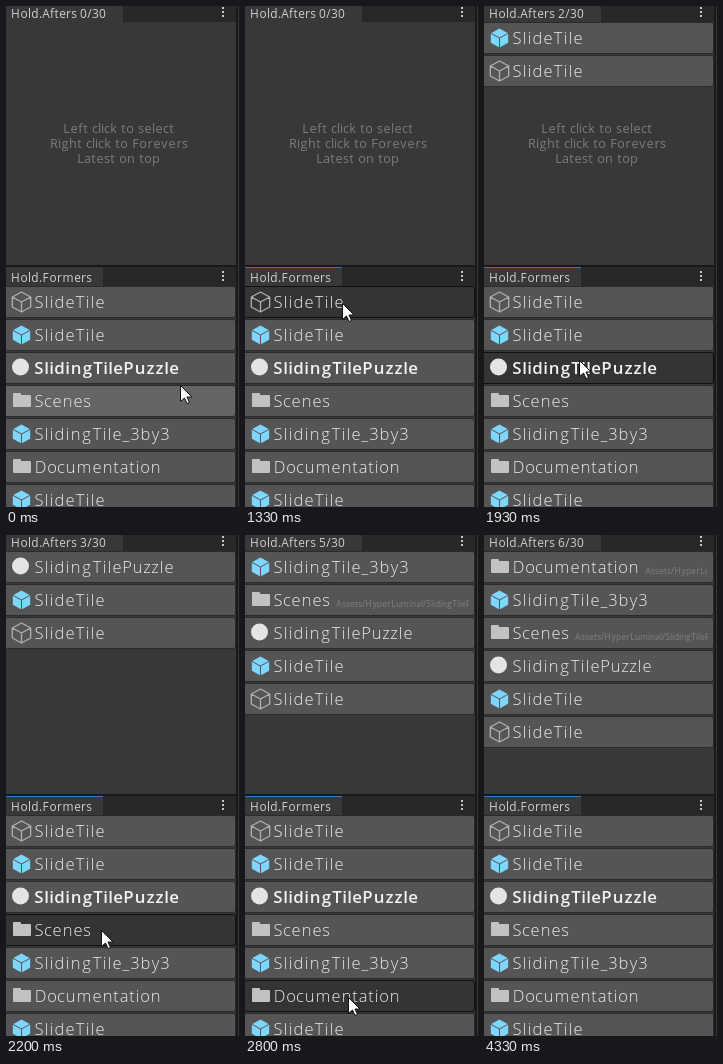
An HTML page with a canvas for the animation above (4790 ms loop, 233 px wide and 501 px high).

```html
<!DOCTYPE html>
<html lang="en">
<head>
<meta charset="utf-8">
<title>Asset shelf</title>
<style>
  html, body { margin: 0; width: 100%; height: 100%; overflow: hidden; background: #383838; }
  canvas { display: block; width: 233px; height: 501px; }
</style>
</head>
<body>
<canvas id="stage" width="233" height="501"></canvas>
<script>
const ctx = document.getElementById('stage').getContext('2d');
const LOOP = 4790, STEP = 1000 / 15;
const PITCH = 33, RECENTS_TOP = 280, LATERS_TOP = 16;
const PATH = 'Assets/HyperLuminal/SlidingTilePuzzle';
const START = [174, 379], EXIT = [111, 503];

// aim: where the pointer rests on each row
const recents = [
  { icon: 'wire', name: 'SlideTile', aim: [97, 297] },
  { icon: 'cube', name: 'SlideTile', aim: [98, 328] },
  { icon: 'scene', name: 'SlidingTilePuzzle', aim: [95, 354], bold: true },
  { icon: 'folder', name: 'Scenes', aim: [95, 395] },
  { icon: 'cube', name: 'SlidingTile_3by3', aim: [101, 427] },
  { icon: 'folder', name: 'Documentation', aim: [103, 462] },
  { icon: 'cube', name: 'SlideTile', aim: [108, 491] }
];

// rows are clicked in a steady rhythm, the last after a pause
const pressStep = i => i < 6 ? Math.floor(20 + 4.5 * i) : 53;

const legs = recents.map(({ aim }, i) => i === 0
  ? { from: 0, to: 9, aim }
  : { from: pressStep(i - 1) + 1, to: Math.min(pressStep(i), pressStep(i - 1) + 6), aim });
legs.push({ from: 57, to: 65, aim: EXIT });

function pointerAt(step) {
  let [x, y] = START;
  for (const { from, to, aim } of legs) {
    const u = Math.min(1, Math.max(0, (step - from) / (to - from)));
    const eased = u * (2 - u);
    x += (aim[0] - x) * eased;
    y += (aim[1] - y) * eased;
  }
  return [Math.round(x), Math.round(y)];
}

function rect(x, y, w, h, color) {
  ctx.fillStyle = color;
  ctx.fillRect(x, y, w, h);
}

function trace(points) {
  ctx.beginPath();
  points.forEach(([x, y]) => ctx.lineTo(x, y));
  ctx.closePath();
}

function panel(x, y, w, h, r, color) {
  ctx.beginPath();
  ctx.roundRect(x, y, w, h, r);
  ctx.fillStyle = color;
  ctx.fill();
}

// letters sit centred on whole-pixel advances, as in hinted interface text
function advances(str, size, weight = 400) {
  ctx.font = `${weight > 500 ? 700 : 400} ${size}px "Noto Sans", sans-serif`;
  return [...str].map(ch => Math.round(ctx.measureText(ch).width + 0.08));
}

function text(str, x, y, size, color, weight = 400) {
  const widths = advances(str, size, weight);
  ctx.font = `${weight} ${size * 0.96}px "Open Sans", "Noto Sans", sans-serif`;
  ctx.fillStyle = color;
  ctx.textAlign = 'center';
  [...str].forEach((ch, i) => {
    ctx.fillText(ch, x + widths[i] / 2, y);
    x += widths[i];
  });
  return x;
}

// corners of a cube seen along its diagonal, clockwise from the top
function corner(y, k) {
  const a = k * Math.PI / 3;
  return [15.5 + 10.6 * Math.sin(a), y - 10 * Math.cos(a)];
}

const icons = {
  cube(y) {
    for (const k of [1, 3, 5]) {
      const [mx, my] = corner(y, k + 1).map((v, axis) => (v + [15.5, y][axis]) / 2);
      const face = [[15.5, y], corner(y, k), corner(y, k + 1), corner(y, k + 2)];
      trace(face.map(([px, py]) => [mx + (px - mx) * 0.89, my + (py - my) * 0.89]));
      ctx.fillStyle = '#7fd6fd';
      ctx.fill();
    }
  },
  wire(y) {
    trace([0, 1, 2, 3, 4, 5].map(k => corner(y, k)));
    for (const k of [1, 3, 5]) {
      ctx.moveTo(15.5, y);
      ctx.lineTo(...corner(y, k));
    }
    ctx.strokeStyle = '#b0b0b0';
    ctx.lineWidth = 1.3;
    ctx.lineJoin = 'round';
    ctx.stroke();
  },
  folder(y) {
    panel(7, y - 8, 8, 5, 1, '#c2c2c2');
    panel(7, y - 6, 18, 12, 1, '#c2c2c2');
  },
  scene(y) {
    ctx.beginPath();
    ctx.arc(14.5, y - 1, 8.5, 0, Math.PI * 2);
    ctx.fillStyle = '#e4e4e4';
    ctx.fill();
  }
};

const looks = {
  idle: { fill: '#555555', border: '#2b2b2b' },
  hover: { fill: '#656565', border: '#2b2b2b' },
  pressed: { fill: '#343434', border: '#101010' }
};

function row(item, top, { state = 'idle', bold = false, path = false } = {}) {
  const { fill, border } = looks[state];
  const mid = top + 16;
  panel(-3, top, 233, 32, 3, border);
  panel(-2, top + 1, 231, 30, 2, fill);
  icons[item.icon](mid);
  const end = bold
    ? text(item.name, 28, mid + 6, 17.6, '#f2f2f2', 600)
    : text(item.name, 28, mid + 6, 17.2, '#ececec', 300);
  if (!path) return;
  ctx.save();
  ctx.beginPath();
  ctx.rect(0, top, 224, 32);
  ctx.clip();
  text(PATH, end + 6, mid + 7, 8.7, '#818181');
  ctx.restore();
}

function tabBar(title, top, height, tabWidth, baseline, dotsY, focused) {
  rect(0, top, 230, height, '#282828');
  panel(-3, top, tabWidth + 3, height, [0, 2, 0, 0], '#383838');
  if (focused) rect(0, top, tabWidth, 1, '#3a79bb');
  text(title, 5, baseline, 12.4, '#cfcfcf');
  for (let i = -1; i < 2; i++) rect(216, dotsY + i * 4 - 1, 2, 2, '#c8c8c8');
}

function hint() {
  ['Left click to select', 'Right click to Forevers', 'Latest on top'].forEach((line, i) => {
    const width = advances(line, 13.2).reduce((a, b) => a + b);
    text(line, Math.round(112.5 - width / 2), 127 + i * 15, 13.2, '#7c7c7c');
  });
}

function pointer(x, y) {
  trace([[0, 0], [0, 16], [4, 12.5], [6.5, 18], [9, 17], [6.5, 11.5], [11.5, 11.5]]
    .map(([dx, dy]) => [x + dx + 0.5, y + dy + 0.5]));
  ctx.fillStyle = '#fff';
  ctx.fill();
  ctx.lineJoin = 'miter';
  ctx.lineWidth = 1;
  ctx.strokeStyle = '#111';
  ctx.stroke();
}

function draw(step) {
  const [px, py] = pointerAt(step);
  const held = recents.findIndex((_, i) => pressStep(i) === step);
  const count = Math.min(6, recents.filter((_, i) => step > pressStep(i)).length);
  const hovered = py < 501 ? Math.floor((py - RECENTS_TOP) / PITCH) : -1;

  rect(0, 0, 233, 501, '#383838');
  tabBar(`Hold.Afters ${count}/30`, 0, 16, 117, 12, 6, false);
  if (count < 3) hint();
  for (let i = 0; i < count; i++) {
    const item = recents[count - 1 - i];
    row(item, LATERS_TOP + i * PITCH, { path: item.icon === 'folder' });
  }

  rect(0, 259, 230, 2, '#191919');
  tabBar('Hold.Formers', 261, 19, 97, 276, 270, step >= pressStep(0));
  recents.forEach((item, i) => {
    const state = held === i ? 'pressed' : hovered === i ? 'hover' : 'idle';
    row(item, RECENTS_TOP + i * PITCH, { state, bold: item.bold });
  });

  rect(230, 0, 2, 501, '#191919');
  rect(232, 0, 1, 501, '#383838');
  pointer(px, py);
}

function tick(now) {
  // frame changes fall on whole hundredths of a second
  const t = Math.floor((now % LOOP) / 10) * 10;
  draw(Math.floor((t + 3.4) / STEP));
  requestAnimationFrame(tick);
}
requestAnimationFrame(tick);
</script>
</body>
</html>
```
